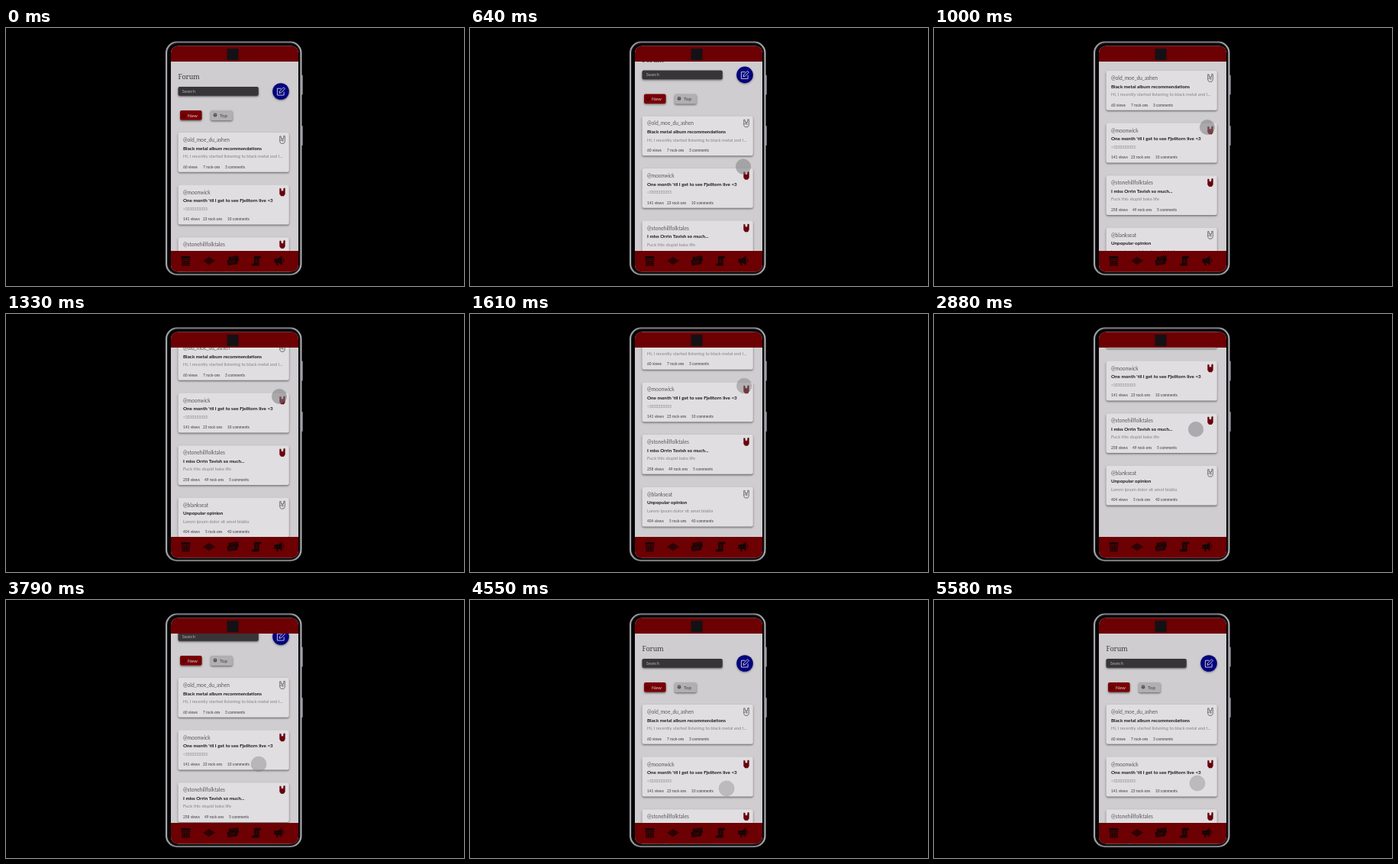
Write an HTML page with a canvas that moves like this. It is 600 by 338 pixels and loops after 5610 ms.

```html
<!DOCTYPE html>
<html lang="en">
<head>
<meta charset="utf-8">
<title>Forum scroll</title>
<style>
html, body { margin: 0; width: 100%; height: 100%; overflow: hidden; background: #000; }
canvas { display: block; width: 600px; height: 338px; }
</style>
</head>
<body>
<canvas id="stage"></canvas>
<script>
const W = 600, H = 338, LOOP = 5610;
const canvas = document.getElementById('stage');
const ctx = canvas.getContext('2d');
const dpr = window.devicePixelRatio || 1;
canvas.width = W * dpr;
canvas.height = H * dpr;

const SANS = 'Lato, "Open Sans", sans-serif';
const SERIF = '"Noto Serif", serif';
const RED = '#6c0003', INK = '#190406', PAGE = '#cfcdd0', CARD = '#e0dee1';

// time, scroll offset
const SCROLL = [[420, 0], [1000, 81], [1330, 102], [1970, 130], [2700, 144],
  [3520, 144], [3790, 35], [4080, 0]];
// time, x, y, opacity
const TOUCH = [[40, 388, 238, 0.5], [420, 358, 211, 0.5], [1000, 358, 130, 0.55],
  [1330, 358, 108, 0.55], [1970, 361, 84, 0.3], [2250, 361, 85, 0.35],
  [2880, 343, 151, 0.52], [3480, 331, 106, 0.45], [3790, 331, 215, 0.4],
  [4080, 332, 249, 0.36], [5580, 345, 240, 0.36]];

const POSTS = [
  { user: '@old_moe_du_ashen', title: 'Black metal album recommendations',
    text: 'Hi, I recently started listening to black metal and I...',
    stats: [['60 views', 232], ['7 rock-ons', 258], ['3 comments', 287]] },
  { user: '@moonwick', title: "One month 'til I get to see Fjelltorn live <3",
    text: '<3333333333', size: 5, liked: true,
    stats: [['141 views', 232], ['23 rock-ons', 258], ['10 comments', 290]] },
  { user: '@stonehillfolktales', title: 'I miss Orrin Tavish so much...',
    text: 'Fuck this stupid baka life', liked: true,
    stats: [['258 views', 232], ['49 rock-ons', 260], ['5 comments', 292]] },
  { user: '@blankseat', title: 'Unpopular opinion',
    text: 'Lorem ipsum dolor sit amet blabla',
    stats: [['404 views', 232], ['5 rock-ons', 261], ['40 comments', 290]] }
];

// Monotone cubic through the keys, so plateaus stay flat
function curve(keys, t, col) {
  const last = keys.length - 1;
  if (t <= keys[0][0]) return keys[0][col];
  if (t >= keys[last][0]) return keys[last][col];
  let i = 0;
  while (t > keys[i + 1][0]) i++;
  const rise = k => (keys[k + 1][col] - keys[k][col]) / (keys[k + 1][0] - keys[k][0]);
  const slope = k => {
    if (k === 0 || k === last) return 0;
    const a = rise(k - 1), b = rise(k);
    return a * b > 0 ? 2 * a * b / (a + b) : 0;
  };
  const h = keys[i + 1][0] - keys[i][0], u = (t - keys[i][0]) / h;
  const s = u * u * (3 - 2 * u);
  return keys[i][col] * (1 - s) + keys[i + 1][col] * s
    + h * u * (1 - u) * ((1 - u) * slope(i) - u * slope(i + 1));
}

function box(x, y, w, h, r, fill) {
  ctx.beginPath();
  ctx.roundRect(x, y, w, h, r);
  ctx.fillStyle = fill;
  ctx.fill();
}

function raised(x, y, w, h, r, fill) {
  ctx.save();
  ctx.shadowColor = 'rgba(0,0,0,0.5)';
  ctx.shadowBlur = 2.5 * dpr;
  ctx.shadowOffsetY = 1.3 * dpr;
  box(x, y, w, h, r, fill);
  ctx.restore();
}

function disc(x, y, r, fill) {
  ctx.beginPath();
  ctx.arc(x, y, r, 0, Math.PI * 2);
  ctx.fillStyle = fill;
  ctx.fill();
}

function label(str, x, y, size, color, weight = 400, family = SANS) {
  ctx.font = `${weight} ${size}px ${family}`;
  ctx.fillStyle = color;
  ctx.fillText(str, x, y);
}

function line(points, color, width, close) {
  ctx.beginPath();
  points.forEach(([x, y]) => ctx.lineTo(x, y));
  if (close) ctx.closePath();
  ctx.strokeStyle = color;
  ctx.lineWidth = width;
  ctx.stroke();
}

function at(x, y, draw) {
  ctx.save();
  ctx.translate(x, y);
  draw();
  ctx.restore();
}

function horns(x, y, liked, color) {
  at(x, y, () => {
    const hand = [[-3.3, -4.6], [-1.9, -4.6], [-1.5, -1.3], [1.5, -1.3], [1.9, -5],
      [3.3, -5], [3.3, 2.6], [1.9, 4.9], [-1.7, 4.9], [-3.3, 2.6]];
    ctx.lineJoin = 'round';
    line(hand, color, 0.7, true);
    ctx.fillStyle = color;
    if (liked) ctx.fill();
    else {
      line([[-3, 0.8], [1.4, 0.8], [0.4, 2.4]], color, 0.6);
      line([[0, -1.3], [0, 0.8]], color, 0.6);
    }
  });
}

function post(p, y, iconColor) {
  raised(225.5, y, 145.3, 51.8, 2.5, CARD);
  label(p.user, 232, y + 12, 6.65, '#59575a');
  label(p.title, 232, y + 22.6, 6.3, '#161517', 700);
  label(p.text, 232, y + 33.2, p.size || 5.85, '#858386');
  p.stats.forEach(([s, x]) => label(s, x, y + 46.6, 4.85, '#3a383b'));
  horns(362, y + 9.4, p.liked, iconColor);
}

function toolbar() {
  label('Forum', 225.5, 66.6, 8.9, '#3c3a3d', 400, SERIF);
  raised(225.5, 77, 105.3, 11.8, 2, '#373538');
  label('Search', 230.8, 85, 5.8, '#b3b1b4');

  ctx.save();
  ctx.shadowColor = 'rgba(0,0,0,0.45)';
  ctx.shadowBlur = 2.5 * dpr;
  ctx.shadowOffsetY = dpr;
  disc(360, 83, 10.8, '#04047c');
  ctx.restore();
  at(360, 83, () => {
    const c = '#d5d4e6';
    line([[0.5, -3.8], [-4.6, -3.8], [-4.6, 5], [4.1, 5], [4.1, 0.4]], c, 0.9);
    line([[-1.9, 2.3], [-1.3, -0.4], [3.6, -5.2], [5.3, -3.4], [0.6, 1.5]], c, 0.9, true);
  });

  raised(228, 108, 28.6, 12.6, 2, '#780004');
  label('New', 238, 116.7, 6.3, '#ded0d3');
  ctx.beginPath();
  ctx.arc(233.2, 114.3, 2.1, -0.9, 4.2);
  ctx.strokeStyle = '#2b0205';
  ctx.lineWidth = 0.8;
  ctx.stroke();

  raised(268, 108, 28.8, 13, 2, '#b1afb2');
  label('Top', 280, 116.9, 6.3, '#454346');
  disc(274, 114, 2.4, '#454346');
  line([[271.8, 113.3], [276.2, 113.3]], '#a5a3a6', 0.5);
  line([[274, 111.8], [274, 116.2]], '#a5a3a6', 0.5);
}

function navIcons() {
  at(235.5, 305, () => {
    box(-6, -6, 12, 3, 1, INK);
    line([[-6.3, -1.5], [6.3, -1.5]], INK, 1.5);
    box(-5, 0, 10, 6.5, 0.5, INK);
    for (let i = 0; i < 3; i++) {
      box(-3.6 + i * 2.7, 1.2, 1.5, 1.4, 0, RED);
      box(-3.6 + i * 2.7, 3.8, 1.5, 1.4, 0, RED);
    }
  });
  at(266, 305, () => {
    for (let i = -4; i <= 4; i++) {
      const h = 5.2 - Math.abs(i) * 1.1;
      line([[i * 1.7, -h], [i * 1.7, h]], INK, 1.3);
    }
  });
  at(297.5, 304.5, () => {
    ctx.rotate(-0.16);
    box(-5.5, -5.2, 13, 7, 1, INK);
    box(-7.8, -1.6, 13, 7, 1, INK);
    line([[-5.5, 0.6], [3, 0.6]], RED, 0.6);
    line([[-5.5, 2.8], [2, 2.8]], RED, 0.6);
    line([[-3, -3.4], [5.3, -3.4]], RED, 0.6);
  });
  at(328, 305, () => {
    box(-3.2, -6.2, 9.4, 2.6, 1.2, INK);
    box(-3, -5, 6.8, 9.5, 0, INK);
    box(-6.2, 3.6, 10, 2.8, 1.3, INK);
    for (let i = 0; i < 3; i++) line([[-1.6, -2 + i * 2], [2.4, -2 + i * 2]], RED, 0.6);
  });
  at(357, 305, () => {
    line([[-5, -2], [0, -2.5], [4, -5.5], [4, 4.5], [0, 1.8], [-5, 1.5]], INK, 1.4, true);
    ctx.fillStyle = INK;
    ctx.fill();
    line([[-2.6, 1.5], [-1.2, 6]], INK, 2.2);
    line([[6, -2.8], [6.8, -0.5], [6, 1.8]], INK, 1);
  });
}

function phone() {
  box(386, 61.5, 3, 26, 1, '#77767c');
  box(386, 128, 3, 26, 1, '#77767c');
  const rim = ctx.createLinearGradient(209, 0, 388, 0);
  rim.addColorStop(0, '#a9a8ae');
  rim.addColorStop(0.08, '#85848a');
  rim.addColorStop(0.9, '#85848a');
  rim.addColorStop(1, '#b4b3b9');
  box(209, 17.5, 178.5, 306.5, 15, rim);
  box(211, 19.3, 174.5, 302.9, 13.5, '#222126');
  box(212, 20.3, 172.5, 300.9, 12.5, '#050506');
}

function draw(t) {
  const scroll = curve(SCROLL, t, 1);
  ctx.setTransform(dpr, 0, 0, dpr, 0, 0);
  ctx.fillStyle = '#000';
  ctx.fillRect(0, 0, W, H);
  phone();

  ctx.save();
  ctx.beginPath();
  ctx.roundRect(216, 23.5, 167, 296, 9);
  ctx.clip();
  box(216, 23, 167, 297, 0, PAGE);
  at(0, -scroll, () => {
    toolbar();
    POSTS.forEach((p, i) => {
      const pressed = i === 1 && t > 1800 && t < 2250;
      post(p, 137 + i * 68.6, pressed ? '#777578' : p.liked ? '#68030c' : '#444245');
    });
  });
  box(216, 23, 167, 21, 0, RED);
  box(216, 292, 167, 28, 0, RED);
  box(289.5, 27, 15, 15, 0, '#131114');
  navIcons();
  ctx.restore();

  if (t >= 30) {
    const [x, y, a] = [1, 2, 3].map(c => curve(TOUCH, t, c));
    disc(x, y, 10, `rgba(124,123,126,${a})`);
    ctx.strokeStyle = `rgba(130,129,132,${0.6 - a})`;
    ctx.lineWidth = 1;
    ctx.stroke();
  }
}

let start;
function tick(now) {
  if (start === undefined) start = now;
  draw((now - start) % LOOP);
  requestAnimationFrame(tick);
}
requestAnimationFrame(tick);
</script>
</body>
</html>
```
